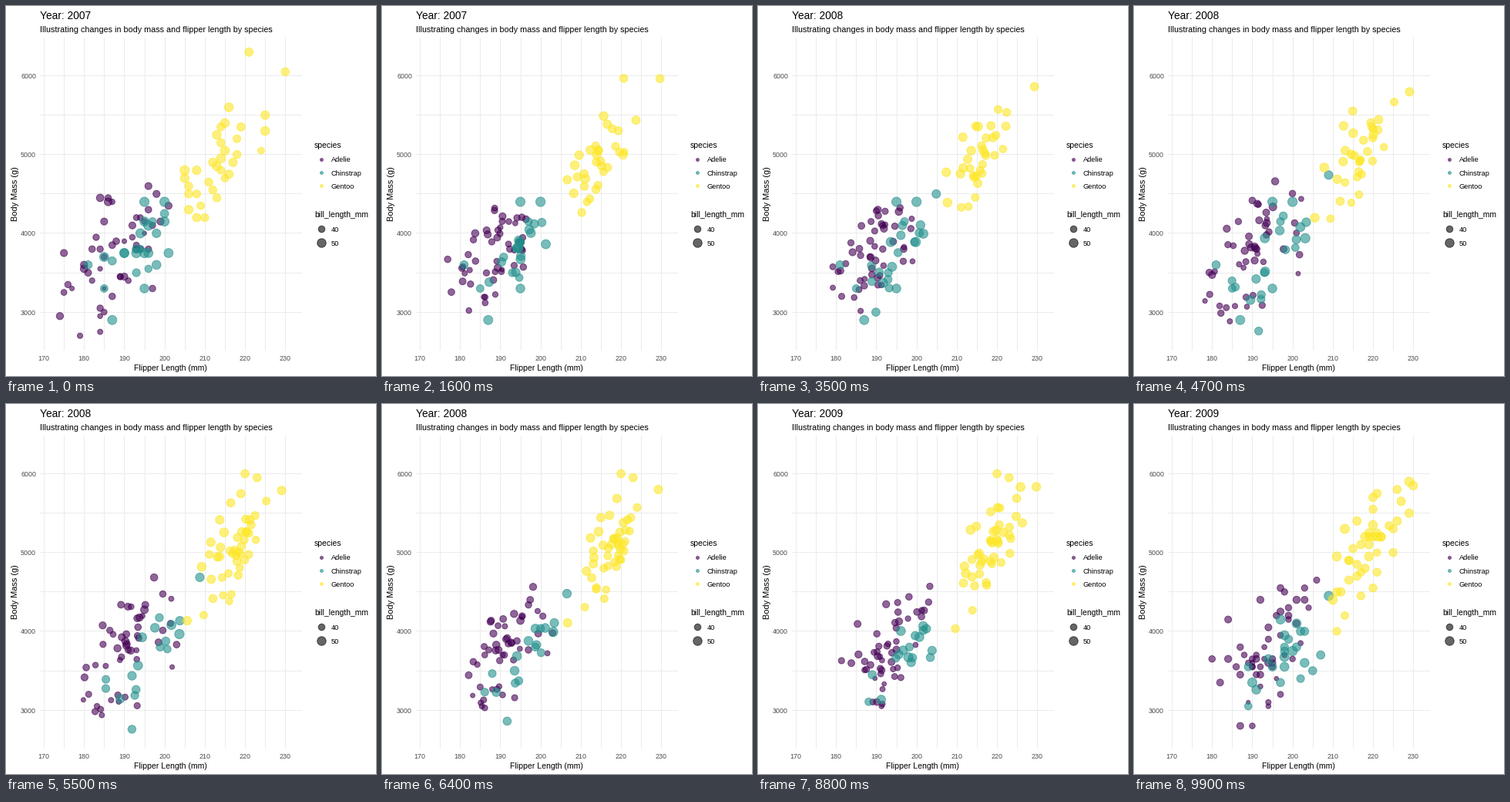
Write a matplotlib script that moves like this. It is 480 px wide and 480 px high and loops after 10000 ms.

```python
import numpy as np
import matplotlib.pyplot as plt
from matplotlib.animation import FuncAnimation

plt.rcParams["font.family"] = "Liberation Sans"

SIZE, DPI = 480, 72          # at 72 dpi one point is one pixel
FRAMES, INTERVAL = 100, 100
MID, LAST = 50, FRAMES - 1   # frames on which 2008 and 2009 are reached
ALPHA = 0.6
GRID, TICK = "#EBEBEB", "#4D4D4D"

# Each species is a correlated cloud whose centre drifts year by year.
# "outliers" are a few leading dots given as (x, y) for each year.
SPECIES = {
    "Adelie": dict(
        color="#440154", counts=(50, 50, 52), bill=(38.8, 2.6),
        center=(187.5, 3700), drift=(2.5, 0), spread=(6.2, 450), rho=0.5,
        outliers=[]),
    "Chinstrap": dict(
        color="#21908C", counts=(26, 18, 24), bill=(48.8, 3.0),
        center=(192.5, 3700), drift=(2.8, 20), spread=(5.2, 320), rho=0.6,
        outliers=[[(193, 3800), (210, 4800), (198, 3675)],
                  [(185, 3700), (192, 2700), (191, 3260)]]),
    "Gentoo": dict(
        color="#FDE725", counts=(34, 46, 44), bill=(47.3, 2.6),
        center=(214.5, 5000), drift=(2.2, 50), spread=(5.2, 470), rho=0.75,
        outliers=[[(230, 6050), (229, 5780), (230, 5850)],
                  [(221, 6300), (220, 5260), (224, 5340)]]),
}

# Dots without a successor rest where they are until the next year.
LEAVERS = {
    ("Chinstrap", 0): [(187, 2900), (195, 4400), (197, 4150),
                       (181, 3600), (195, 3300)],
    ("Gentoo", 1): [(220, 6000), (223, 5950)],
}


def px(x):
    return 59.5 + 5.22 * (x - 172)


def py(y):
    return 427.8 - 0.10222 * (y - 2700)


def radius(size):
    return 0.375 * (2.845 * size + 0.945)


def bill_radius(bill):
    share = np.clip((np.asarray(bill) - 32.1) / 27.5, 0, 1)
    return radius(1 + 5 * np.sqrt(share))


def make_state(name, year, rng):
    """Columns x, y and radius in pixels for one species in one year."""
    spec = SPECIES[name]
    u, v, w = rng.triangular(-2.4, 0, 2.4, (3, spec["counts"][year]))
    rho = spec["rho"]
    unit = np.column_stack([u, rho * u + np.sqrt(1 - rho**2) * v])
    center = np.add(spec["center"], np.multiply(spec["drift"], year))
    step = np.array([1, 50])     # whole mm, 50 g
    xy = step * np.round((center + unit * spec["spread"]) / step)
    for i, path in enumerate(spec["outliers"]):
        xy[i] = path[year]
    rest = LEAVERS.get((name, year), [])
    if rest:
        xy[-len(rest):] = rest
    mean, sd = spec["bill"]
    bill = mean + sd * (0.4 * v + 0.9 * w)
    return np.column_stack([px(xy[:, 0]), py(xy[:, 1]), bill_radius(bill)])


rng = np.random.default_rng(27)
states = {name: [make_state(name, k, rng) for k in range(3)]
          for name in SPECIES}


def pose(name, frame):
    a, b, c = states[name]
    if frame >= LAST:
        return c
    if frame < MID:
        start, end, t = a, b, frame / MID
    else:
        start, end, t = b, c, (frame - MID) / (LAST - MID)
    m = min(len(start), len(end))
    moving = start[:m] + (end[:m] - start[:m]) * t
    return np.vstack([moving, start[m:]])


fig = plt.figure(figsize=(SIZE / DPI, SIZE / DPI), dpi=DPI, facecolor="white")
ax = fig.add_axes([0, 0, 1, 1])
ax.set_xlim(0, SIZE)
ax.set_ylim(SIZE, 0)
ax.axis("off")


def label(x, y, text, size, color="black", **kw):
    return ax.text(x, y, text, fontsize=size, color=color, **kw)


def dots(x, y, r, color):
    return ax.scatter(x, y, s=(2 * np.asarray(r))**2, color=color,
                      alpha=ALPHA, linewidths=1, zorder=3)


# Panel grid and axes
for value in range(170, 235, 5):
    ax.plot([px(value)] * 2, [41, 446], color=GRID, lw=1, zorder=1)
    if value % 10 == 0:
        label(px(value), 460, str(value), 8.9, TICK, ha="center")
for value in range(3000, 6001, 500):
    ax.plot([44, 383], [py(value) - 0.5] * 2, color=GRID, lw=1, zorder=1)
    if value % 1000 == 0:
        label(39, py(value) + 3.5, str(value), 8.9, TICK, ha="right")
label(213.4, 473, "Flipper Length (mm)", 10.5, ha="center")
label(15, 243.5, "Body Mass (g)", 11, rotation=90, ha="center",
      va="baseline", rotation_mode="anchor")

# Headings
title = label(44, 17, "Year: 2007", 13.7)
label(44, 34, "Illustrating changes in body mass and flipper length by species",
      10.8)

# Legends
label(400, 184, "species", 10.4)
for i, (name, spec) in enumerate(SPECIES.items()):
    y = 198.5 + 17.28 * i
    dots([408.5], [y], [radius(1.5)], spec["color"])
    label(422, y + 4, name, 9.2)
label(400, 274, "bill_length_mm", 10.4)
for i, bill in enumerate((40, 50)):
    y = 289 + 17.6 * i
    dots([408.5], [y], [bill_radius(bill)], "black")
    label(422, y + 4, str(bill), 9.2)

clouds = {name: dots([], [], [], spec["color"])
          for name, spec in SPECIES.items()}


def update(frame):
    title.set_text(f"Year: {round(2007 + 2 * frame / LAST)}")
    for name, cloud in clouds.items():
        p = pose(name, frame)
        cloud.set_offsets(p[:, :2])
        cloud.set_sizes((2 * p[:, 2])**2)
    return [title, *clouds.values()]


anim = FuncAnimation(fig, update, frames=FRAMES, interval=INTERVAL,
                     repeat=True, repeat_delay=0, blit=False)
plt.show()
```
